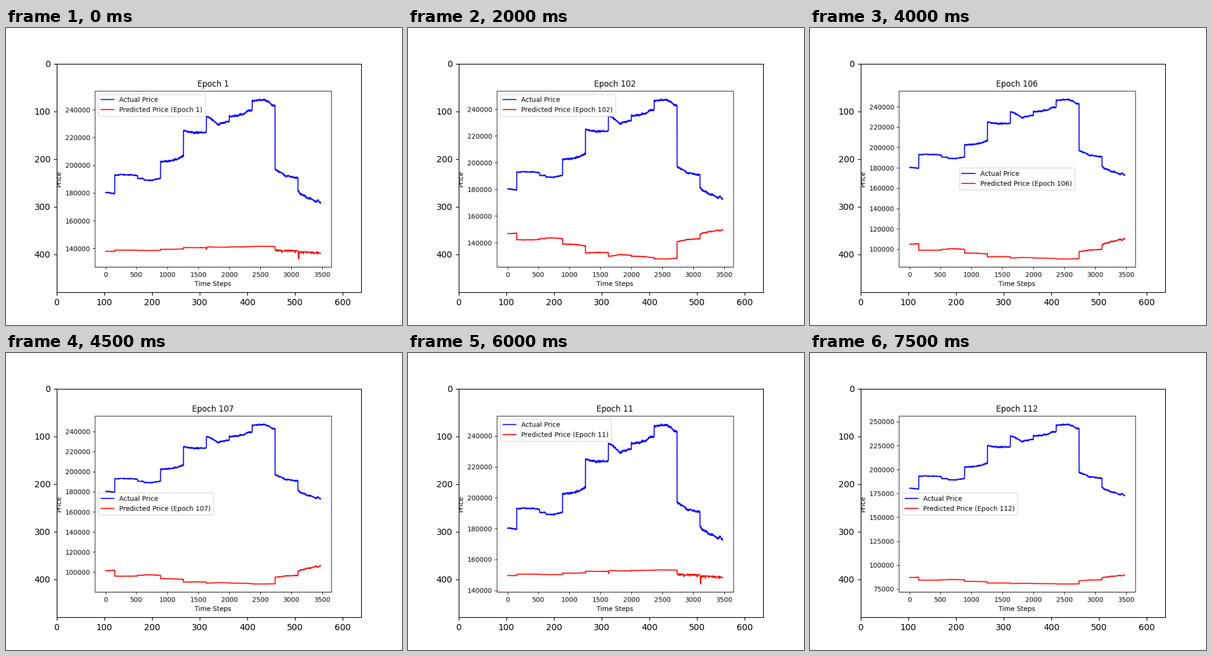
Write a matplotlib script that moves like this. It is 640 by 480 pixels and loops after 8 s.

```python
import numpy as np
import matplotlib.pyplot as plt
from matplotlib.animation import FuncAnimation

N = 3472
SESSION = 370               # steps per trading session
OFFSET = 222                # the first session is already under way
CEILING = 248.4             # prices are in thousands

# Open, middle and close of each session.
LEVELS = np.array([
    (180.4, 180.5, 179.7), (193.2, 193.2, 192.7), (191.0, 189.0, 190.5),
    (203.0, 203.0, 206.0), (224.4, 223.5, 224.3), (235.5, 229.6, 231.0),
    (235.5, 236.2, 240.0), (246.6, 246.6, 242.6), (197.0, 192.0, 190.4),
    (181.3, 175.8, 172.9),
])

# Saved charts play back in alphabetical order: 1, 10, 100, 101, ...
EPOCHS = sorted(range(1, 113), key=str)[:16]

rng = np.random.default_rng(7)
steps = np.arange(N + 1)


def jitter(gap):
    knots = np.arange(0, N + gap, gap)
    return np.interp(steps, knots, rng.normal(size=knots.size))


def make_actual():
    session, t = np.divmod(steps + OFFSET, SESSION)
    t = 2 * t / SESSION
    start, middle, end = LEVELS[session].T
    price = np.where(t < 1, start + (middle - start) * t,
                     middle + (end - middle) * (t - 1))
    rough = np.where(session < 3, 0.2, 0.36)
    price += rough * (jitter(3) + 1.2 * jitter(35))
    return np.minimum(price, CEILING)


actual = make_actual()
depth = actual.max() - actual
depth /= depth.max()
noise = np.abs(jitter(8)) * np.where(steps > 2737, 0.8, 0.08)


def spike(center, size):
    return size * np.exp(-((steps - center) / 5) ** 2)


def predict(epoch):
    low = np.interp(epoch, [1, 11, 100, 102, 104, 107, 109, 110, 112],
                    [132.7, 144.4, 150, 127.9, 95.2, 88, 87.2, 85.4, 80.2])
    tone = depth ** 1.336
    if epoch < 100:
        return low + 8.9 - 4.2 * tone - noise - spike(1631, 2) - spike(3117, 4.5)
    if epoch > 102:
        tone = (tone + depth ** 5.2) / 2
    return low + tone * np.interp(epoch, [102, 104, 112], [22, 24, 9.5])


def legend_place(epoch):
    if epoch < 103:
        return "upper left"
    return "center" if epoch < 107 else "center left"


def snapshot(ax, epoch):
    """Draw one chart on the whole figure and return it as an image."""
    ax.clear()
    ax.plot(steps, actual * 1000, color="blue", label="Actual Price")
    ax.plot(steps, predict(epoch) * 1000, color="red",
            label=f"Predicted Price (Epoch {epoch})")
    ax.set(title=f"Epoch {epoch}", xlabel="Time Steps", ylabel="Price")
    ax.legend(loc=legend_place(epoch))
    fig.canvas.draw()
    return np.array(fig.canvas.buffer_rgba())


fig, chart = plt.subplots(figsize=(6.4, 4.8), dpi=100, facecolor="white")
shots = [snapshot(chart, epoch) for epoch in EPOCHS]

# The charts are shown as pictures inside a pixel-ruled frame.
fig.clear()
picture = fig.add_subplot().imshow(shots[0])


def update(k):
    picture.set_data(shots[k])
    return picture,


anim = FuncAnimation(fig, update, frames=len(shots), interval=500, repeat=True)
plt.show()
```
